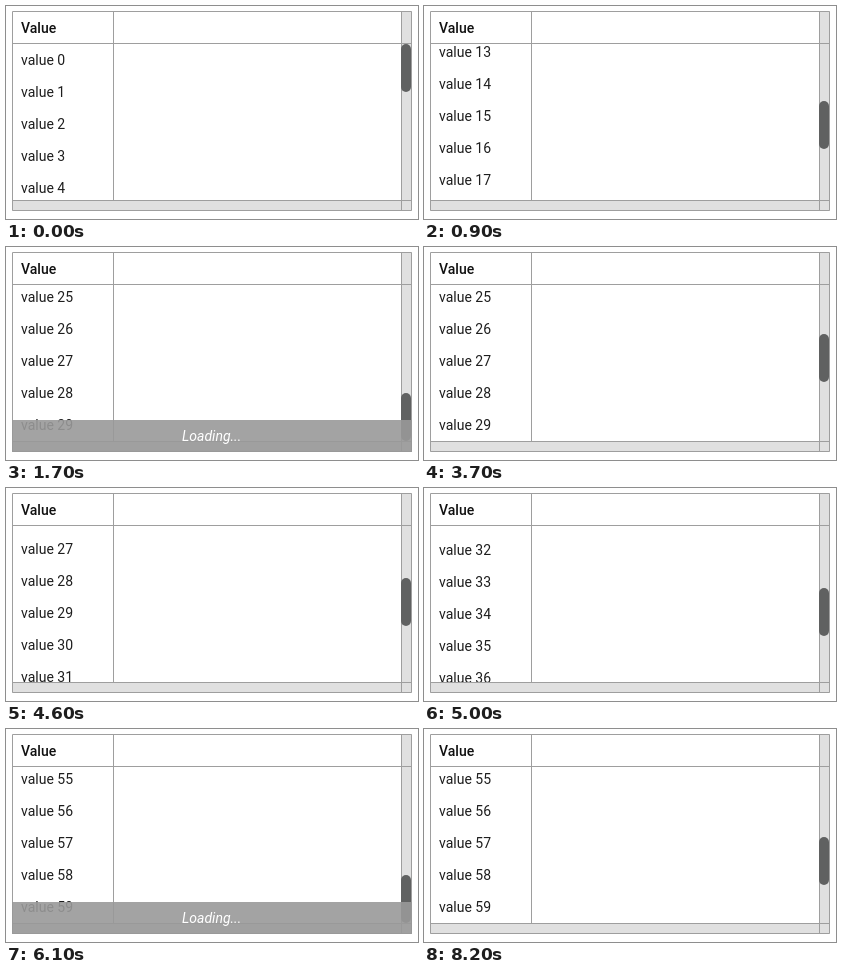
An HTML page for the animation above (9200 ms loop, 412 by 213 pixels).

```html
<!DOCTYPE html>
<html lang="en">
<head>
<meta charset="utf-8">
<title>Endless table</title>
<style>
  html, body { margin: 0; width: 100%; height: 100%; overflow: hidden; background: #fff; }
  svg { display: block; width: 412px; height: 213px; }
  text { font: 14px Roboto, sans-serif; fill: #1e1e1e; }
  .head { font-weight: 500; fill: #111; }
  .note { font-style: italic; fill: #fff; }
  .lines { fill: none; stroke: #9e9e9e; }
</style>
</head>
<body>
<svg viewBox="0 0 412 213">
  <defs><clipPath id="body"><rect x="7" y="38" width="388" height="156"/></clipPath></defs>
  <path fill="#e0e0e0" d="M395 5h11v200h-400v-11h389z"/>
  <text class="head" x="15" y="27">Value</text>
  <g id="rows" clip-path="url(#body)"></g>
  <path class="lines" d="M6.5 5.5h399v199h-399zM6 37.5h400M107.5 5v190M6 194.5h400M395.5 5v200"/>
  <rect id="thumb" x="395" width="10" height="48" rx="5" fill="#606161"/>
  <g id="loading">
    <rect x="6" y="173" width="400" height="32" fill="#999" fill-opacity=".9"/>
    <text class="note" x="176" y="194">Loading...</text>
  </g>
</svg>
<script>
const LOOP = 9200, ROW = 32, VIEW = 156, TOP = 38, TRAVEL = 108;
const NOTCH = 53, PAGE = 30;

// Each entry: time in ms, wheel notches turned at that moment
const wheel = [
  [400, 1], [500, 2], [800, 2], [900, 3], [1200, 3], [1300, 1], [1600, 3], [1700, 1],
  [4600, 1], [4700, 2], [5000, 1], [5100, 3], [5400, 2], [5500, 2],
  [5700, 1], [5800, 3], [6000, 1], [6100, 3]
];
const loads = [[1700, 3700], [6100, 8200]];

const get = id => document.getElementById(id);
const rows = get('rows'), thumb = get('thumb'), loading = get('loading');

const cells = Array.from({ length: 7 }, () => {
  const cell = document.createElementNS('http://www.w3.org/2000/svg', 'text');
  cell.setAttribute('x', 15);
  return rows.appendChild(cell);
});

const rowCount = t => PAGE * (1 + loads.filter(([, end]) => t >= end).length);
const maxScroll = t => rowCount(t) * ROW - VIEW;

function scrollAt(t) {
  let pos = 0;
  for (const [at, turns] of wheel) {
    if (t < at) break;
    pos = Math.min(pos + turns * NOTCH, maxScroll(at));
  }
  return pos;
}

function draw(t) {
  const pos = scrollAt(t), first = Math.floor(pos / ROW), count = rowCount(t);
  cells.forEach((cell, i) => {
    const n = first + i;
    cell.textContent = n < count ? 'value ' + n : '';
    cell.setAttribute('y', TOP + 21 + n * ROW - pos);
  });
  thumb.setAttribute('y', Math.round(TOP + TRAVEL * pos / maxScroll(t)));
  const busy = loads.some(([from, to]) => t >= from && t < to);
  loading.setAttribute('visibility', busy ? 'visible' : 'hidden');
}

const start = performance.now();
function tick() {
  draw((performance.now() - start) % LOOP);
  requestAnimationFrame(tick);
}
tick();
</script>
</body>
</html>
```
